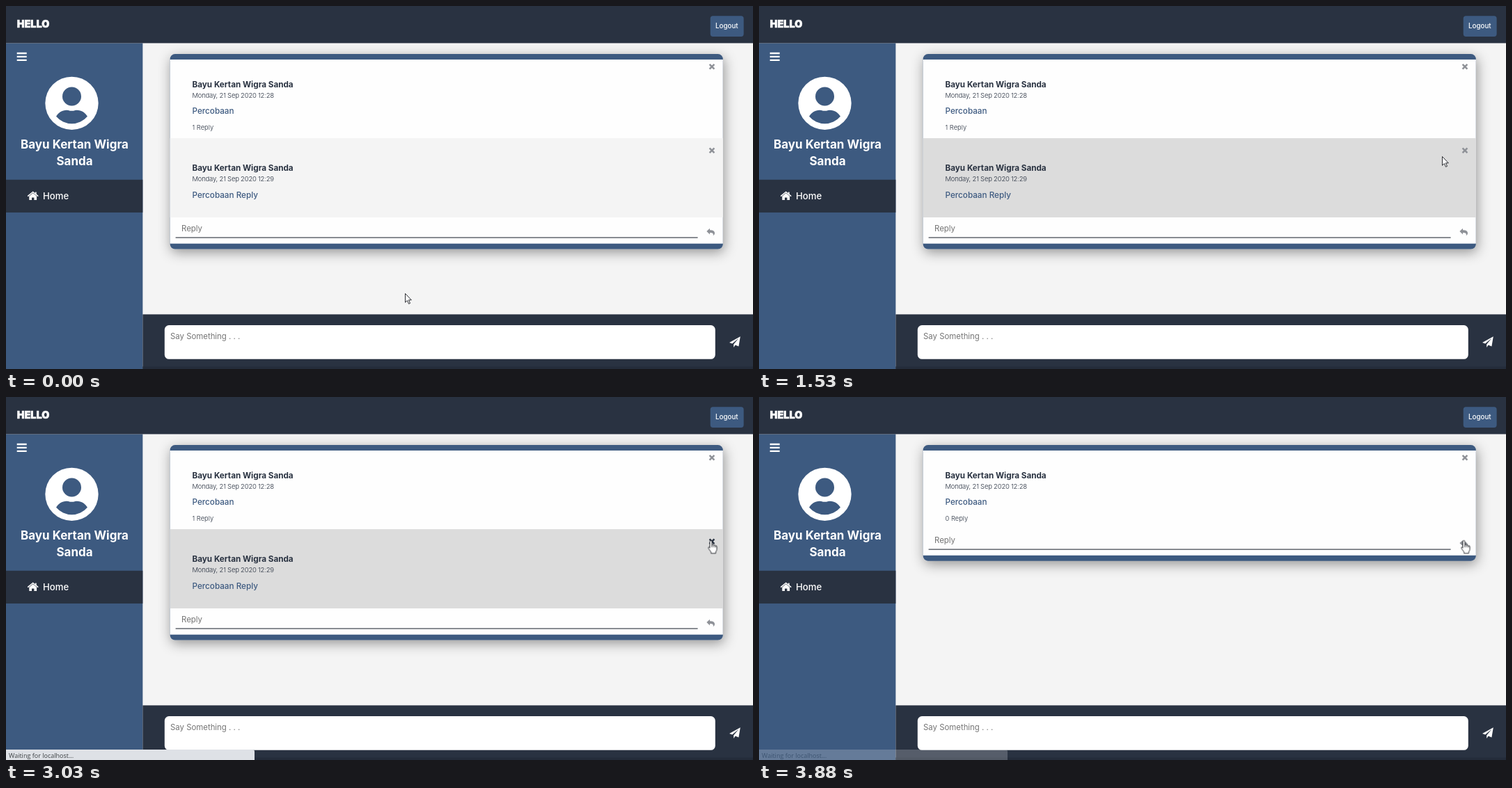
Recreate the animation shown at these times as an HTML page. Size 1073 by 522 pixels, loop 4.11 s.

```html
<!DOCTYPE html>
<html lang="id">
<head>
<meta charset="utf-8">
<title>Hello</title>
<style>
  html, body { margin: 0; width: 100%; height: 100%; overflow: hidden; background: #f4f4f4; }
  svg { position: absolute; left: 0; top: 0; display: block; }
  text { font-family: Inter, "Open Sans", sans-serif; fill: #293241; white-space: pre; }
  .navy { fill: #293241; }
  .blue { fill: #3d5a80; }
  .white, text.white { fill: #fff; }
  .logo { font-size: 14.4px; font-weight: 900; stroke: #fff; stroke-width: .5; }
  .button { font-size: 9.8px; font-weight: 500; }
  .profile { font-size: 17px; font-weight: 700; text-anchor: middle; }
  .menu { font-size: 13.2px; font-weight: 500; }
  .author { font-size: 11.7px; font-weight: 700; }
  .date { font-size: 9.5px; font-weight: 300; letter-spacing: -.22px; }
  .body { font-size: 11.7px; font-weight: 500; fill: #3d5a80; }
  .count { font-size: 9.4px; font-weight: 300; }
  .hint { font-size: 11.4px; fill: #757575; }
  .status { font: 9px "Open Sans", "Noto Sans", sans-serif; fill: #3c4043; }
  .cross { stroke: #8e9197; stroke-width: 2.5; fill: none; }
  .outlined { fill: #fff; stroke: #16181d; stroke-width: .9; stroke-linejoin: round; }
</style>
</head>
<body>
<svg width="1073" height="522" viewBox="0 0 1073 522">
  <defs>
    <path id="x" d="M-3.4-3.4 3.4 3.4M3.4-3.4-3.4 3.4"/>
    <filter id="shadow" x="-10%" y="-30%" width="120%" height="160%">
      <feDropShadow dy="6" stdDeviation="11.5" flood-opacity=".4"/>
    </filter>
  </defs>

  <!-- boxes of the 1366px wide page, scaled to the stage -->
  <g transform="scale(.7855)">
    <g filter="url(#shadow)">
      <rect class="blue" id="card" x="300" y="88" width="1011" height="357" rx="9"/>
      <rect id="sheet" x="300" y="98" width="1011" height="337" fill="#fefefe"/>
    </g>
    <rect class="blue" y="68" width="250" height="600"/>
    <rect class="navy" width="1366" height="68"/>
    <rect class="blue" x="1288" y="18" width="61" height="38" rx="5"/>
    <rect class="navy" y="318" width="250" height="60"/>
    <rect class="navy" x="250" y="564.5" width="1116" height="104"/>
    <rect x="250" y="660" width="1116" height="8" fill="#242c3a"/>
    <rect class="white" x="290" y="584.5" width="1007" height="62" rx="8"/>
    <g transform="translate(120.3 178)">
      <circle class="white" r="48.6"/>
      <circle class="blue" cy="-12.5" r="17.2"/>
      <path class="blue" d="M-28.6 24.2C-25 17.3-17.8 12.5-9.4 12.5-6 12.5-5 14 0 14S6 12.5 9.4 12.5C17.8 12.5 25 17.3 28.6 24.2A37.5 37.5 0 0 1-28.6 24.2Z"/>
    </g>
  </g>

  <text class="logo white" x="15.7" y="31">HELLO</text>
  <text class="button white" x="1019" y="32.3">Logout</text>
  <path d="M15.7 68h14m-14 4.9h14m-14 4.9h14" stroke="#fff" stroke-width="2.3"/>
  <text class="profile white" x="98.5" y="205">Bayu Kertan Wigra</text>
  <text class="profile white" x="98.5" y="228.5">Sanda</text>
  <g class="white">
    <path d="M33.3 273.5 38.7 269 44.1 273.5V278.4q0 .6-.6.6H40.4V275.4H37V279H33.9q-.6 0-.6-.6Z"/>
    <path d="M41.8 267.6h1.9v3.6h-1.9Z"/>
    <path d="M31.7 273.2 38.7 267.5 45.7 273.2" fill="none" stroke="#fff" stroke-width="1.5" stroke-linecap="round"/>
  </g>
  <text class="menu white" x="53" y="278">Home</text>

  <!-- post -->
  <use class="cross" href="#x" x="1014" y="87.2"/>
  <text class="author" x="267.5" y="116.6">Bayu Kertan Wigra Sanda</text>
  <text class="date" x="267.5" y="131.6">Monday, 21 Sep 2020 12:28</text>
  <text class="body" x="267.5" y="155.2">Percobaan</text>
  <text class="count" id="one" x="267.5" y="178">1 Reply</text>
  <text class="count" id="zero" x="267.5" y="178">0 Reply</text>

  <g id="answer">
    <rect id="answerBack" transform="scale(.7855)" x="300" y="242" width="1011" height="145" fill="#f4f4f4"/>
    <use class="cross" id="remove" href="#x" x="1014" y="207.8"/>
    <text class="author" x="267.5" y="237">Bayu Kertan Wigra Sanda</text>
    <text class="date" x="267.5" y="252">Monday, 21 Sep 2020 12:29</text>
    <text class="body" x="267.5" y="275.6">Percobaan Reply</text>
  </g>

  <g id="footer">
    <text class="hint" x="252" y="324">Reply</text>
    <rect x="243.6" y="332.3" width="750" height="1.5" fill="#62666e"/>
    <path fill="#8e9197" d="M1006.4 324 1011 319.8V322.2C1015.5 322.3 1018 323.4 1018 326.6 1018 328.4 1017 329.6 1015.8 330.2 1016.6 327 1015 326.1 1011 326V328.4Z"/>
  </g>

  <!-- composer -->
  <text class="hint" x="236" y="479">Say Something . . .</text>
  <path class="white" d="M1054.8 475.2 1052.4 489.4 1047.6 487.5 1045.2 491V486.4L1052.4 477.8 1043.2 485.6 1039 483.9Z"/>

  <g id="status">
    <path d="M0 507H354q3 0 3 3V522H0Z" fill="#dee1e6"/>
    <text class="status" x="4" y="519">Waiting for localhost...</text>
  </g>

  <ellipse id="click" cx="1012" cy="206.5" rx="10" ry="9.5" fill="#ff0" fill-opacity=".47"/>
  <g id="pointer">
    <path class="outlined" id="arrow" d="M.5.5V13.2L3.4 10.5 5.5 15.3 7.5 14.4 5.4 9.8H9.3Z"/>
    <path class="outlined" id="hand" d="M-1.5 10.5V1.3Q-1.4 0 0 0T1.5 1.3V6Q3.4 5 4.2 6.6 5.9 5.8 6.6 7.4 8.6 6.9 8.6 9V12.5Q8.4 14.6 7 16V18.3H.2V16.4L-3.4 11.4Q-4.2 9.8-3 9.2-2.1 9-1.5 10.5ZM1.5 6V9.5M4.2 6.6V9.5M6.6 7.4V9.7"/>
  </g>
</svg>
<script>
  const LOOP = 4110, TICK = 77;
  const MOVE = 150, ENTER = 600, HOVER = 2000, PRESS = 2540, RELEASE = 2690;
  const LOADING = 3030, REMOVED = 3480, LOADED = 3680;
  const animations = [];

  // Runs one property through { at, value, easing } stops on the shared timeline.
  function play(id, property, stops) {
    const frames = stops.map(({ at, value, easing = "step-end" }) =>
      ({ offset: at / LOOP, [property]: value, easing }));
    frames.push({ offset: 1, [property]: stops.at(-1).value });
    const timing = { duration: LOOP, iterations: Infinity };
    animations.push(document.getElementById(id).animate(frames, timing));
  }

  const swap = (id, property, before, after, at) =>
    play(id, property, [{ at: 0, value: before }, { at, value: after }]);

  const show = (id, from, to = LOOP) =>
    play(id, "opacity", [{ at: 0, value: 0 }, { at: from, value: 1 }, { at: to, value: 0 }]);

  const hide = (id, at) => swap(id, "opacity", 1, 0, at);

  const fade = (at, from, to) => [
    { at, value: from, easing: "steps(4, start)" },
    { at: at + 3.5 * TICK, value: to }
  ];

  // The pointer jumps once per tick between a few key places.
  const places = [
    [0, 573, 413], [MOVE, 573, 413], [680, 672, 260], [1070, 854, 223],
    [1230, 929, 221], [1530, 981, 216], [1770, 1000, 207], [2240, 1012.5, 206.5]
  ];
  play("pointer", "transform", places.map(([at, x, y], i) => {
    const next = places[i + 1] || [LOOP];
    const jumps = Math.round((next[0] - at) / TICK);
    return { at, value: `translate(${x}px, ${y}px)`, easing: `steps(${jumps}, end)` };
  }));
  hide("arrow", HOVER);
  show("hand", HOVER);
  show("click", PRESS, RELEASE);

  play("answerBack", "fill", [{ at: 0, value: "#f4f4f4" }, ...fade(ENTER, "#f4f4f4", "#dcdcdc")]);
  play("remove", "stroke", [{ at: 0, value: "#8e9197" }, ...fade(HOVER, "#8e9197", "#293241")]);
  play("status", "opacity", [{ at: 0, value: 0 }, { at: LOADING, value: 1 }, ...fade(LOADED, 1, 0)]);

  hide("answer", REMOVED);
  hide("one", REMOVED);
  show("zero", REMOVED);
  swap("footer", "transform", "translateY(0px)", "translateY(-113.9px)", REMOVED);
  swap("card", "height", "357px", "212px", REMOVED);
  swap("sheet", "height", "337px", "192px", REMOVED);

  const start = document.timeline.currentTime;
  animations.forEach(animation => { animation.startTime = start; });
</script>
</body>
</html>
```
